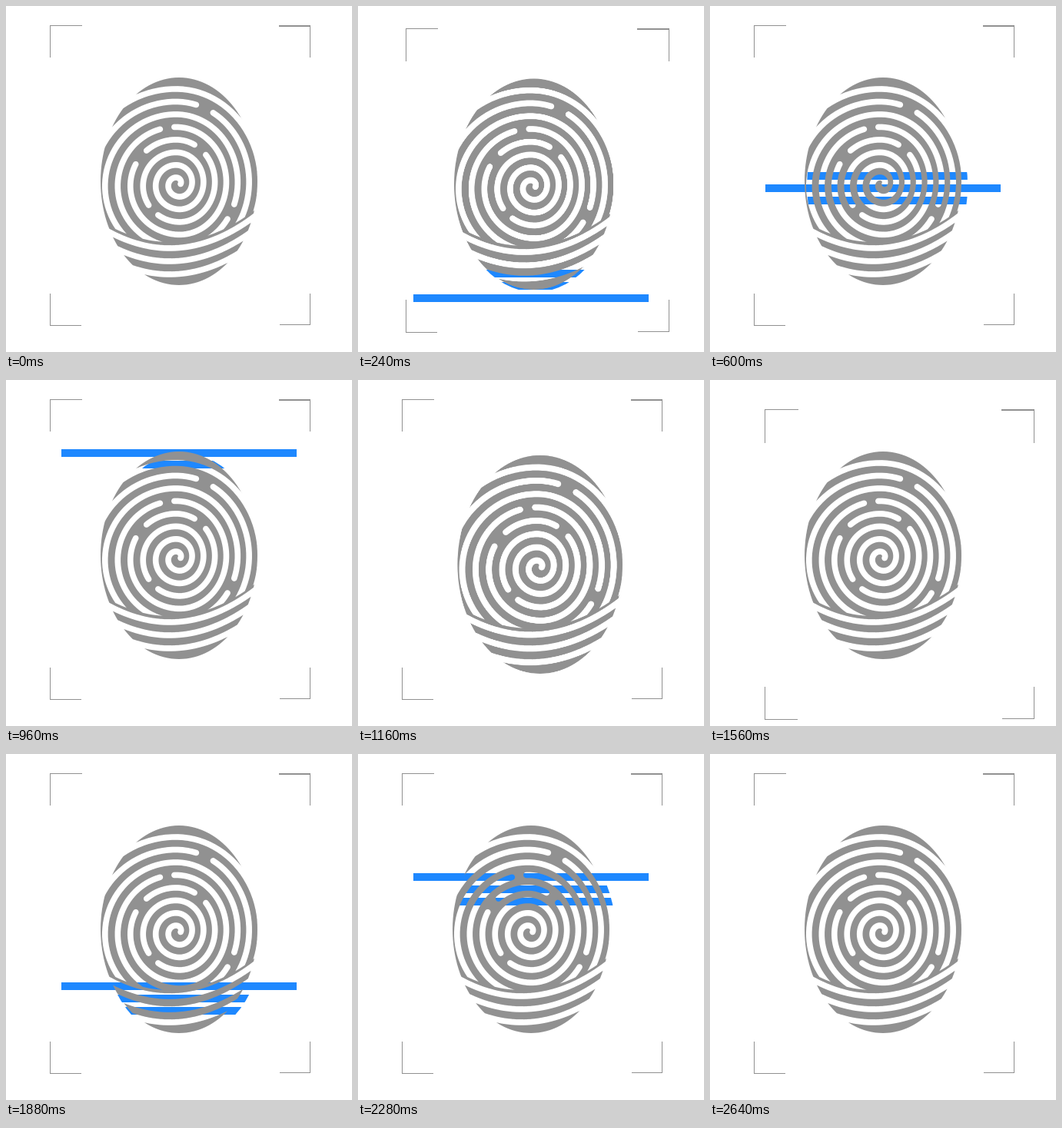
Recreate the animation shown at these times as an HTML page with a canvas. Size 450x450 px, loop 2.8 s.

```html
<!DOCTYPE html>
<html lang="en">
<head>
<meta charset="utf-8">
<title>Fingerprint scan</title>
<style>
html, body { margin: 0; width: 100%; height: 100%; overflow: hidden; background: #fff; }
canvas { display: block; width: 450px; height: 450px; }
</style>
</head>
<body>
<canvas id="stage" width="450" height="450"></canvas>
<script>
const SIZE = 450, LOOP = 2800, STEP = 40;
const GRAY = '#919191', BLUE = '#1e88ff';
const PITCH = 16.5, LOWEST_SLOT = 21;
const ctx = document.getElementById('stage').getContext('2d');

const outline = new Path2D();
outline.ellipse(225, 228, 102, 135, 0, 0, 2 * Math.PI);

// One long valley winds outwards, squeezed on the right and broken where ridges join.
function spiralValley() {
  const joins = [2.13, 2.65, 2.9, 3.78, 4.43, 5.69];
  const path = new Path2D();
  let drawing = false;
  for (let turn = -0.5; turn < 7.3; turn += 0.01) {
    const r = 12.2 + PITCH * turn, a = turn * 2 * Math.PI;
    const dx = -r * Math.cos(a);
    const x = 223.5 + dx * (dx > 0 ? 0.9 : 1);
    const y = 231.5 + r * Math.sin(a);
    if (joins.some(j => Math.abs(j - turn) * r < 1.4)) drawing = false;
    else if (drawing) path.lineTo(x, y);
    else { path.moveTo(x, y); drawing = true; }
  }
  return path;
}

// Shallow bowl reaching its lowest point at the given height
function bowl(bottom, path = new Path2D()) {
  for (let x = 120; x <= 330; x += 5) {
    path.lineTo(x, bottom - 0.0034 * (x - 213) ** 2);
  }
  return path;
}

function makePrint() {
  const layer = document.createElement('canvas');
  layer.width = layer.height = SIZE * 2;
  const g = layer.getContext('2d');
  g.scale(2, 2);
  g.fillStyle = GRAY;
  g.fill(outline);
  g.globalCompositeOperation = 'destination-out';
  g.lineCap = g.lineJoin = 'round';
  g.lineWidth = 7.6;
  for (let i = 0; i < 3; i++) g.stroke(bowl(315 + 17 * i));
  const upper = bowl(307);
  upper.lineTo(330, 80);
  upper.lineTo(120, 80);
  g.clip(upper);
  g.stroke(spiralValley());
  return layer;
}
const print = makePrint();

function pulse(t, peak, halfWidth) {
  const d = Math.abs(t - peak) / halfWidth;
  return d < 1 ? (1 + Math.cos(Math.PI * d)) / 2 : 0;
}

// The print beats seven times per loop, the frame only twice.
function printGrowth(t) {
  let sum = 0;
  for (let beat = 0; beat < 7; beat++) sum += pulse(t, 167 + 321 * beat, 110);
  return 0.063 * sum;
}
const frameGrowth = t => 0.048 * (pulse(t, 335, 140) + pulse(t, 1612, 140));

function drawCorners(grow) {
  const place = v => Math.round(v + (v + 375) * grow);
  const bracket = (x0, x1, y0, y1, edgeX, edgeY, weight = 1) => {
    ctx.fillRect(place(x0), place(edgeY), place(x1) - place(x0), weight);
    ctx.fillRect(place(edgeX), place(y0), 1, place(y1) - place(y0));
  };
  ctx.fillStyle = GRAY;
  bracket(57, 99, 25, 67, 57, 25);
  bracket(355, 396, 25, 67, 395, 25, 2);
  bracket(57, 98, 374, 415, 57, 415);
  bracket(356, 396, 374, 415, 395, 414);
}

function drawBar(slot) {
  ctx.fillRect(72, Math.round(42 + slot * 15.85), 306, 10);
}

// The bar dips to the lowest slot, then climbs steadily to the top and vanishes.
function drawSweep(t, turnTime, topTime, trail) {
  if (t < turnTime - 2 * STEP || t > topTime) return;
  const climb = Math.abs(t - turnTime) / (topTime - turnTime);
  const slot = LOWEST_SLOT * (1 - climb);
  ctx.fillStyle = BLUE;
  ctx.save();
  ctx.scale(1.025, 1.025);
  ctx.clip(outline);
  ctx.scale(1 / 1.025, 1 / 1.025);
  for (const offset of trail) drawBar(slot + offset);
  ctx.restore();
  drawBar(slot);
}

function draw(t) {
  ctx.fillStyle = '#fff';
  ctx.fillRect(0, 0, SIZE, SIZE);
  drawCorners(frameGrowth(t));
  drawSweep(t, 240, 1080, t <= 240 ? [-1, -2] : [-1, 1]);
  drawSweep(t, 1660, 2600, [1, 2]);
  const size = SIZE * (1 + printGrowth(t));
  ctx.drawImage(print, 0, 0, size, size);
}

const start = performance.now();
function tick() {
  const t = (performance.now() - start) % LOOP;
  draw(Math.floor(t / STEP) * STEP);
  requestAnimationFrame(tick);
}
tick();
</script>
</body>
</html>
```
